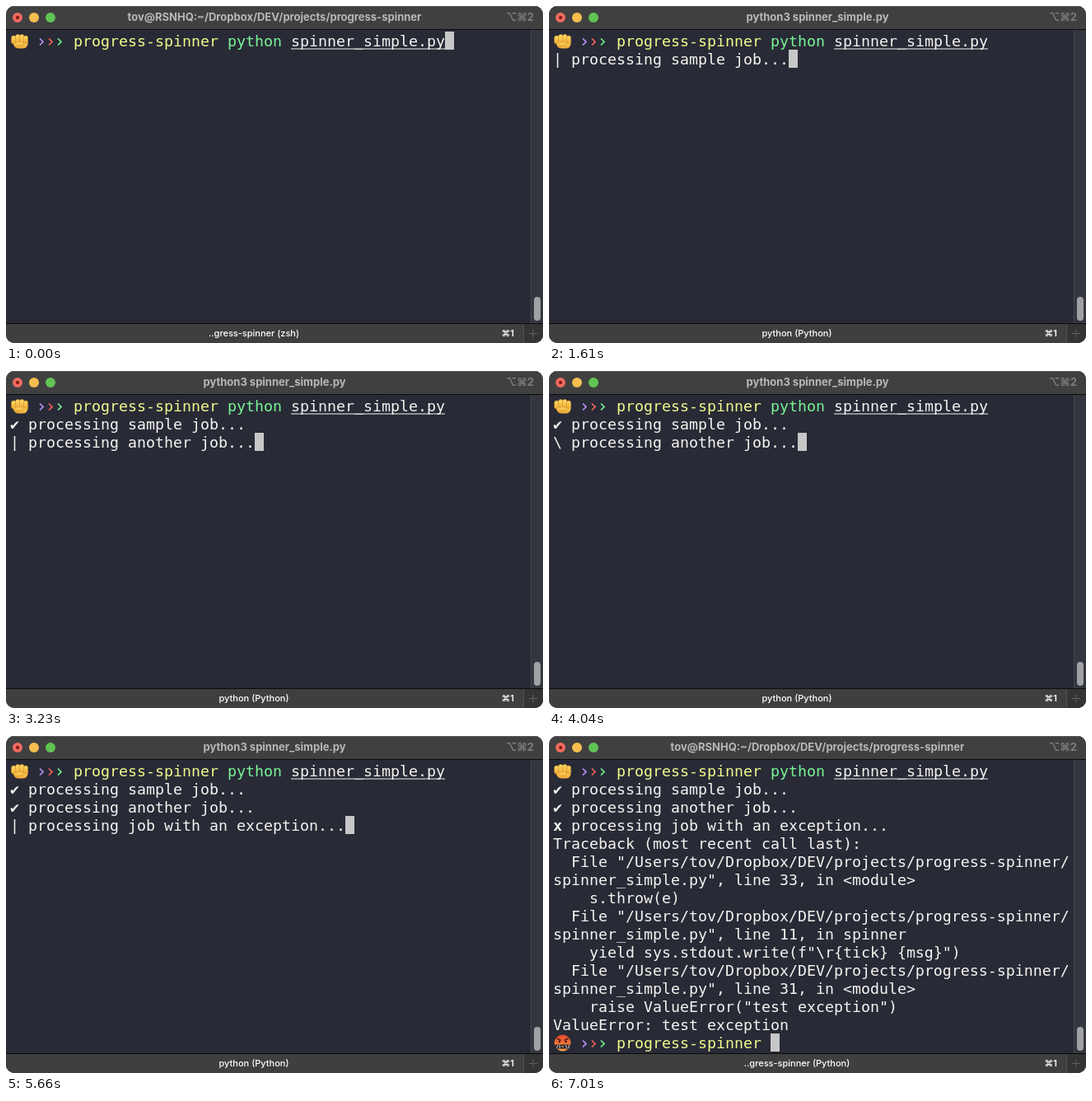
An HTML page that plays this animation: 652x409 px, repeating every 8 s.

```html
<!DOCTYPE html>
<html lang="en">
<head>
<meta charset="utf-8">
<title>Progress spinner</title>
<style>
  html, body { margin: 0; width: 100%; height: 100%; overflow: hidden; background: #fff; }
  svg { display: block; width: 652px; height: 409px; }
  text { white-space: pre; font-variant-ligatures: none; }
  .term { font: 18.27px "DejaVu Sans Mono", monospace; fill: #f4f4ef; }
  .head { font: 700 13px Inter, "DejaVu Sans", sans-serif; fill: #b8b8b8; }
  .tab { font: 500 11px Inter, "DejaVu Sans", sans-serif; fill: #fff; }
</style>
</head>
<body>
<svg viewBox="0 0 652 409">
  <defs>
    <clipPath id="window"><rect width="652" height="409" rx="10"/></clipPath>
    <linearGradient id="skin" x1="0" y1="0" x2="0" y2="1">
      <stop offset="0" stop-color="#ffdc66"/><stop offset="1" stop-color="#f0a936"/>
    </linearGradient>
    <linearGradient id="rage" x1="0" y1="0" x2="0" y2="1">
      <stop offset="0" stop-color="#e2452f"/><stop offset="1" stop-color="#f6a446"/>
    </linearGradient>
    <g id="chevrons" fill="none" stroke-width="1.700">
      <path d="M41 39.500l4 4-4 4" stroke="#bd93f9"/>
      <path d="M52 39.500l4 4-4 4" stroke="#ff6259"/>
      <path d="M63 39.500l4 4-4 4" stroke="#72f68f"/>
    </g>
  </defs>
  <g clip-path="url(#window)">
    <rect width="652" height="409" fill="#282a36"/>

    <rect width="652" height="28" fill="#404040"/>
    <rect width="652" height="1" fill="#5c5c5c"/>
    <rect y="28" width="652" height="1" fill="#0c0c0c"/>
    <circle cx="14" cy="14" r="6" fill="#ed6a5f"/>
    <circle cx="14" cy="14" r="2" fill="#7d150f"/>
    <circle cx="34" cy="14" r="6" fill="#f6be4f"/>
    <circle cx="54" cy="14" r="6" fill="#61c454"/>
    <text id="title" class="head" x="326" y="18" text-anchor="middle"></text>
    <text class="head" x="641" y="18" text-anchor="end" style="fill:#7c7c7c">⌥⌘2</text>

    <rect x="637" y="29" width="15" height="356" fill="#34363f"/>
    <rect x="637" y="29" width="1" height="356" fill="#43454d"/>
    <rect x="641" y="353" width="8" height="29" rx="4" fill="#a0a1a5"/>

    <rect id="cursor" width="11" height="22" fill="#c7c7c7"/>
    <g fill="url(#skin)" stroke="#c98a25" stroke-width=".5">
      <path d="M9 42h17.500v4q-1 5.500-6 5.500h-5q-5 0-6.500-5z" stroke="none"/>
      <rect x="6.500" y="36" width="5.500" height="10" rx="2.700"/>
      <rect x="11.500" y="34.500" width="5.500" height="11" rx="2.700"/>
      <rect x="16.500" y="34.500" width="5.500" height="11" rx="2.700"/>
      <rect x="21.500" y="36" width="5" height="9.500" rx="2.500"/>
      <path d="M9 46q4-3 10-2q3 .5 2.500 2.500t-4 2l-5 .5q-3 0-3.500-3z"/>
    </g>
    <use href="#chevrons"/>
    <text class="term" x="82" y="49"><tspan fill="#f1fa8c">progress-spinner </tspan><tspan fill="#7af595">python </tspan>spinner_simple.py</text>
    <rect x="346" y="51.500" width="187" height="1" fill="#f4f4ef"/>
    <g id="rows"></g>

    <g id="prompt">
      <circle cx="16.500" cy="372.500" r="10" fill="url(#rage)"/>
      <path d="M9.500 367l5 2.500M23.500 367l-5 2.500" stroke="#5a1a12" stroke-width="1.500"/>
      <circle cx="12.500" cy="371" r="1.300" fill="#4a1610"/>
      <circle cx="20.500" cy="371" r="1.300" fill="#4a1610"/>
      <rect x="7" y="374.500" width="19" height="5" rx="1.500" fill="#2b2222"/>
      <path d="M9 379l2-4M13 375v4M15 377h3M20 375l2 4M24 375v4" stroke="#eee" stroke-width=".9"/>
      <use href="#chevrons" y="330"/>
      <text class="term" x="82" y="379" style="fill:#f1fa8c">progress-spinner</text>
    </g>

    <rect y="385" width="652" height="1" fill="#0c0c0c"/>
    <rect y="386" width="652" height="23" fill="#3f3f3f"/>
    <rect x="628" y="386" width="24" height="23" fill="#343434"/>
    <rect x="628" y="386" width="1" height="23" fill="#505050"/>
    <text id="tab" class="tab" x="301" y="401" text-anchor="middle"></text>
    <text class="tab" x="617" y="401" text-anchor="end" style="font-weight:600">⌘1</text>
    <path d="M635 397.500h10M640 392.500v10" stroke="#606060" fill="none"/>
  </g>
</svg>
<script>
const LOOP = 8000, TICK = 254, FAIL = 7010;
const CELL = 11, LINE = 22, LEFT = 5, TOP = 31;
const HOME = "tov@RSNHQ:~/Dropbox/DEV/projects/progress-spinner";
const JOBS = [
  { start: 40, text: "processing sample job..." },
  { start: 2580, text: "processing another job..." },
  { start: 5120, text: "processing job with an exception..." }
];
const fileLine = (line, scope) => [
  '  File "/Users/tov/Dropbox/DEV/projects/progress-spinner/',
  `spinner_simple.py", line ${line}, in ${scope}`
];
const TRACE = [
  "Traceback (most recent call last):",
  ...fileLine(33, "<module>"),
  "    s.throw(e)",
  ...fileLine(11, "spinner"),
  '    yield sys.stdout.write(f"\\r{tick} {msg}")',
  ...fileLine(31, "<module>"),
  '    raise ValueError("test exception")',
  "ValueError: test exception"
];

const el = id => document.getElementById(id);
const rows = Array.from({ length: 14 }, (_, i) => {
  const row = document.createElementNS("http://www.w3.org/2000/svg", "text");
  row.setAttribute("class", "term");
  row.setAttribute("x", LEFT);
  row.setAttribute("y", TOP + (i + 1) * LINE + 18);
  return el("rows").appendChild(row);
});

// The screen refreshes slightly slower than the spinner ticks.
function refreshTime(t) {
  if (t < 270) return 0;
  if (t < 530) return 270;
  return Math.min(FAIL, 530 + 270 * Math.floor((t - 530) / 270));
}

function screen(t) {
  if (t < 270) return { title: HOME, tab: "..gress-spinner (zsh)", lines: [], cursor: [0, 48] };
  const failed = t >= FAIL;
  const begun = JOBS.filter(job => t >= job.start);
  const lines = begun.map((job, i) => {
    const mark = i < begun.length - 1 ? "✔"
      : failed ? "x"
      : "-\\|/"[Math.floor((t - job.start) / TICK) % 4];
    return mark + " " + job.text;
  });
  if (failed) {
    return { title: HOME, tab: "..gress-spinner (Python)", lines: lines.concat(TRACE), cursor: [15, 24], failed };
  }
  return {
    title: "python3 spinner_simple.py",
    tab: t < 800 ? "python (zsh)" : "python (Python)",
    lines,
    cursor: [lines.length, lines[lines.length - 1].length]
  };
}

function setLine(row, text) {
  row.textContent = text;
  if (text.startsWith("x ")) {
    row.innerHTML = '<tspan font-weight="700">x</tspan>' + text.slice(1);
  }
}

let shown = -1;
function draw() {
  const t = refreshTime(performance.now() % LOOP);
  if (t !== shown) {
    shown = t;
    const s = screen(t);
    el("title").textContent = s.title;
    el("tab").textContent = s.tab;
    rows.forEach((row, i) => setLine(row, s.lines[i] || ""));
    el("prompt").style.display = s.failed ? "" : "none";
    el("cursor").setAttribute("x", LEFT + s.cursor[1] * CELL);
    el("cursor").setAttribute("y", TOP + s.cursor[0] * LINE);
  }
  requestAnimationFrame(draw);
}
draw();
</script>
</body>
</html>
```
